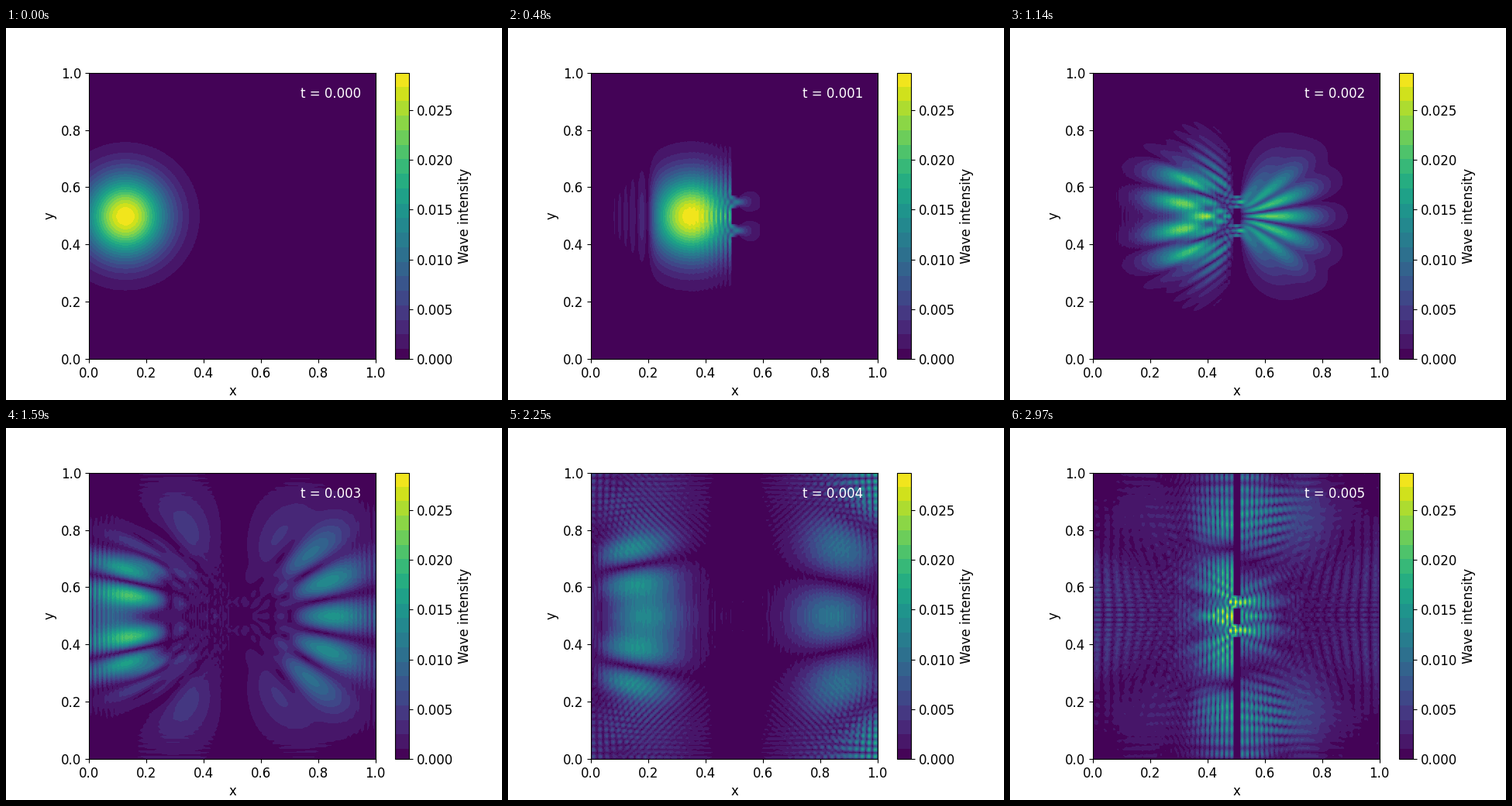
A matplotlib script for the animation above (3000 ms loop, 640 px wide and 480 px high).

```python
import numpy as np
import matplotlib.pyplot as plt
from matplotlib.animation import FuncAnimation
from matplotlib.colors import ListedColormap

# Double-slit wave packet: i du/dt = -laplacian(u) on the unit square,
# Crank-Nicolson in time, hard walls.
N, H, DT = 200, 0.005, 2.5e-5
FRAMES, STEPS = 100, 2
XC, YC, SIGMA, MOMENTUM = 0.125, 0.5, 0.1, 200
FONT = 12

grid = np.arange(N)
pos = grid * H
mode = grid + 1

# Sine basis diagonalises the empty box
S = np.sqrt(2 / (N + 1)) * np.sin(np.pi * np.outer(mode, mode) / (N + 1))
energy = 4 / H**2 * np.sin(np.pi * mode / (2 * (N + 1)))**2
G = 1 / (1 + 0.5j * DT * (energy[:, None] + energy[None, :]))

# Barrier cells: five columns with two slits
off = np.abs(grid - N // 2)
cols = grid[off <= 2]
rows = grid[(off <= 5) | (off >= 15)]
Sx, Sy = S[cols], S[rows]


def wall_response():
    """Inverse response of the empty box restricted to the barrier cells."""
    blocks = [[(Sy * (G @ (a * b))) @ Sy.T for b in Sx] for a in Sx]
    return np.linalg.inv(np.block(blocks))


def simulate():
    x, y = np.meshgrid(pos, pos)
    u = np.exp(-((x - XC)**2 + (y - YC)**2) / (2 * SIGMA**2)
               + 1j * MOMENTUM * (x - XC))
    u /= np.sqrt(np.sum(np.abs(u)**2))
    inv = wall_response()
    c = S @ u @ S
    out = []
    for _ in range(FRAMES):
        out.append(np.abs(S @ c @ S))
        for _ in range(STEPS):
            on_wall = Sy @ ((G * c) @ Sx.T)
            force = -(inv @ on_wall.T.ravel()).reshape(len(cols), len(rows))
            c = 2 * G * (c + Sy.T @ force.T @ Sx) - c
    return out


def banded_viridis(first=0.034, step=0.051):
    t = np.linspace(0, 1, 512)
    band = np.ceil((t - first) / step).clip(0)
    level = np.where(band > 0, first + step * (band - 0.5), 0.01)
    return ListedColormap(plt.get_cmap("viridis")(level.clip(0, 1)))


waves = simulate()

fig, ax = plt.subplots(figsize=(6.4, 4.8), dpi=100)
img = ax.imshow(waves[0], extent=[0, 1, 0, 1], cmap=banded_viridis(),
                vmin=0, vmax=waves[0].max())
ax.set_xlabel("x", fontsize=FONT)
ax.set_ylabel("y", fontsize=FONT)
ax.tick_params(labelsize=FONT)

cbar = fig.colorbar(img, ax=ax)
cbar.set_label("Wave intensity", fontsize=FONT)
cbar.ax.tick_params(labelsize=FONT)

label = ax.text(0.95, 0.95, "t = 0.000", color="white", fontsize=FONT,
                ha="right", va="top")


def update(i):
    img.set_data(waves[i])
    label.set_text(f"t = {i * STEPS * DT:.3f}")
    return img, label


anim = FuncAnimation(fig, update, frames=FRAMES, interval=30, repeat=True)
plt.show()
```
